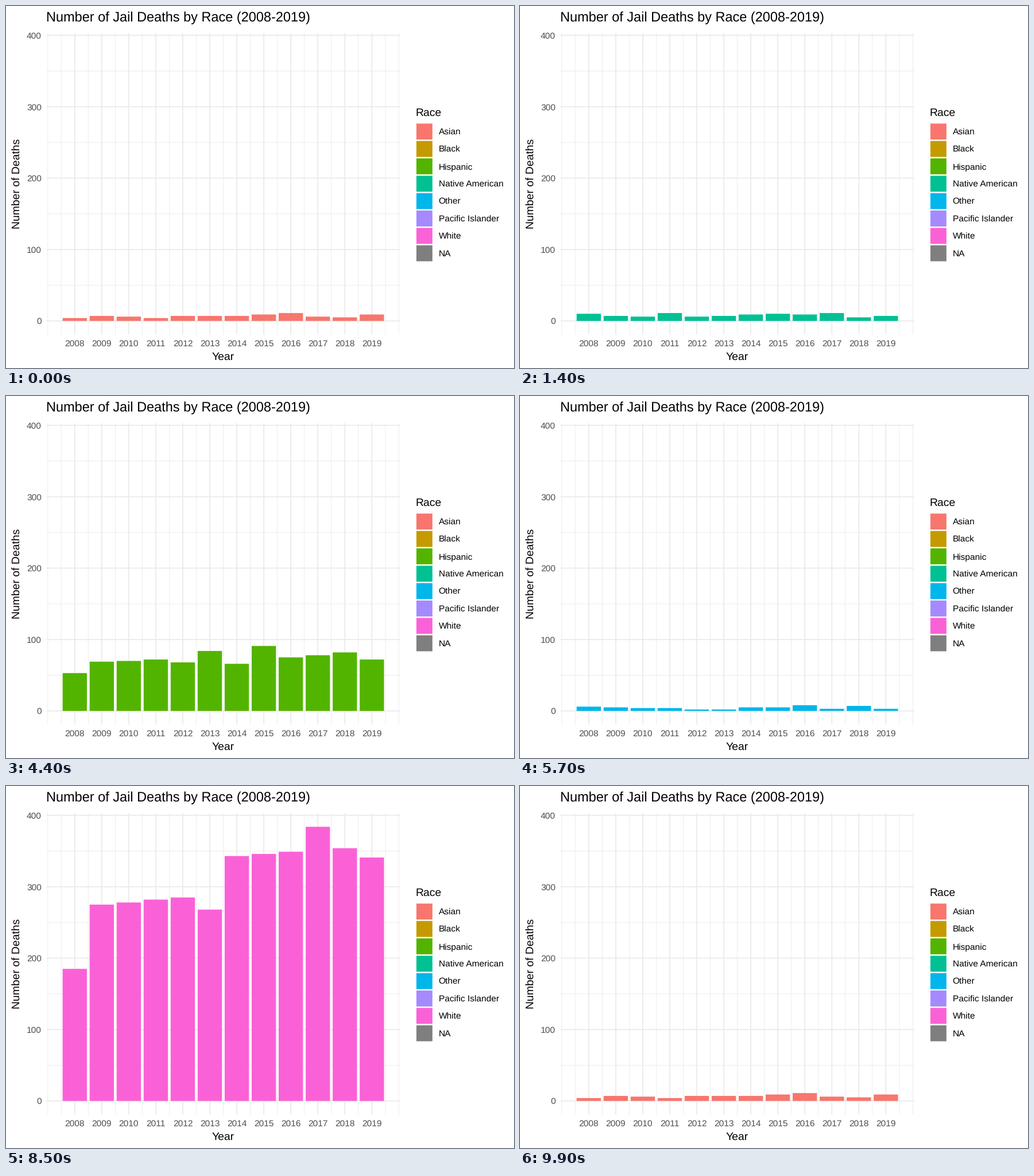
A matplotlib script for the animation above (10000 ms loop, 885 px wide and 632 px high).

```python
import matplotlib.pyplot as plt
import numpy as np
from matplotlib.animation import FuncAnimation
from matplotlib.patches import Rectangle

W, H = 885, 632
STEP_MS, FRAMES = 100, 100

plt.rcParams["font.family"] = "Liberation Sans"
plt.rcParams["text.hinting"] = "none"

COLORS = {
    "Asian": "#F8766D",
    "Black": "#C49A00",
    "Hispanic": "#53B400",
    "Native American": "#00C094",
    "Other": "#00B6EB",
    "Pacific Islander": "#A58AFF",
    "White": "#FB61D7",
    "NA": "#7F7F7F",
}

YEARS = np.arange(2008, 2020)
YEAR_W, UNIT_H, ZERO_Y = 47.05, 1.2463, 549.8
rng = np.random.default_rng(8)


def trend(**turns):
    """Yearly counts on straight runs between turning points (y08=..., y19=...)."""
    years = [2000 + int(key[1:]) for key in turns]
    return np.round(np.interp(YEARS, years, list(turns.values())))


def scatter(low, high):
    return rng.integers(low, high + 1, len(YEARS))


# Start in ms, group, yearly counts
SCENES = [
    (0, "Asian", trend(y08=4, y09=7, y11=4, y12=7, y14=7, y16=11, y17=6, y18=5, y19=9)),
    (1400, "Native American", scatter(5, 11)),
    (2900, "Black", trend(y08=156, y09=169, y10=171, y11=156, y12=163, y13=189,
                          y16=175, y17=200, y19=193)),
    (4400, "Hispanic", trend(y08=53, y09=69, y11=72, y12=68, y13=84, y14=66,
                             y15=91, y16=75, y18=82, y19=72)),
    (5700, "Other", scatter(2, 8)),
    (7100, "Pacific Islander", trend(y08=1, y10=1, y11=0, y13=0, y14=2, y15=1,
                                     y16=3, y17=0, y18=2, y19=0)),
    (8500, "White", trend(y08=185, y09=275, y12=285, y13=268, y14=343, y16=349,
                          y17=384, y18=354, y19=341)),
]
SCENES.append((9900, *SCENES[0][1:]))


def year_x(year):
    return 119.8 + (year - 2008) * YEAR_W


def count_y(count):
    return ZERO_Y - count * UNIT_H


LEFT, RIGHT = year_x(2006.955), year_x(2020.045)
TOP, BOTTOM = count_y(403.2), count_y(-19.2)

# At 72 dpi one point is one pixel
fig = plt.figure(figsize=(W / 72, H / 72), dpi=72, facecolor="white")
ax = fig.add_axes([0, 0, 1, 1])
ax.set(xlim=(0, W), ylim=(H, 0))
ax.axis("off")


def grid_line(xs, ys, width):
    ax.plot(xs, ys, color="#EBEBEB", lw=width, solid_capstyle="butt",
            snap=False, zorder=1)


def label(x, y, text, size, color="black", **kw):
    ax.text(x, y, text, fontsize=size, color=color, va="baseline", **kw)


def box(x, y, w, h, color):
    return ax.add_patch(Rectangle((x, y), w, h, fc=color, lw=0, snap=False, zorder=2))


MAJOR, MINOR = 1.87, 0.94
for count in range(0, 401, 50):
    y = count_y(count)
    grid_line([LEFT, RIGHT], [y, y], MINOR if count % 100 else MAJOR)
for year in np.arange(2007, 2020.5, 0.5):
    x = year_x(year)
    grid_line([x, x], [TOP, BOTTOM], MAJOR if year in YEARS else MINOR)

TEXT, HEAD = 15.46, 19.33
for count in range(0, 401, 100):
    label(61.8, count_y(count) + 5.5, str(count), TEXT, "#4D4D4D", ha="right")
for year in YEARS:
    label(year_x(year), 594, str(year), TEXT, "#4D4D4D", ha="center")

label(70, 27, "Number of Jail Deaths by Race (2008-2019)", 23.5)
label((LEFT + RIGHT) / 2, 617.6, "Year", HEAD, ha="center")
label(24.2, (TOP + BOTTOM) / 2, "Number of Deaths", HEAD, ha="center",
      rotation=90, rotation_mode="anchor")

label(713.6, 192, "Race", HEAD)
for i, (name, color) in enumerate(COLORS.items()):
    mid = 219.2 + i * 30.36
    box(715, mid - 13.94, 27.88, 27.88, color)
    label(753.6, mid + 5.5, name, TEXT)

bars = [box(year_x(year - 0.45), ZERO_Y, 0.9 * YEAR_W, 0, "white")
        for year in YEARS]


def update(i):
    _, group, counts = [s for s in SCENES if s[0] <= i * STEP_MS][-1]
    for bar, count in zip(bars, counts):
        bar.set_height(-count * UNIT_H)
        bar.set_facecolor(COLORS[group])
        bar.set_visible(bool(count > 0))
    return bars


anim = FuncAnimation(fig, update, frames=FRAMES, interval=STEP_MS,
                     repeat=True, repeat_delay=0, blit=False)
plt.show()
```
